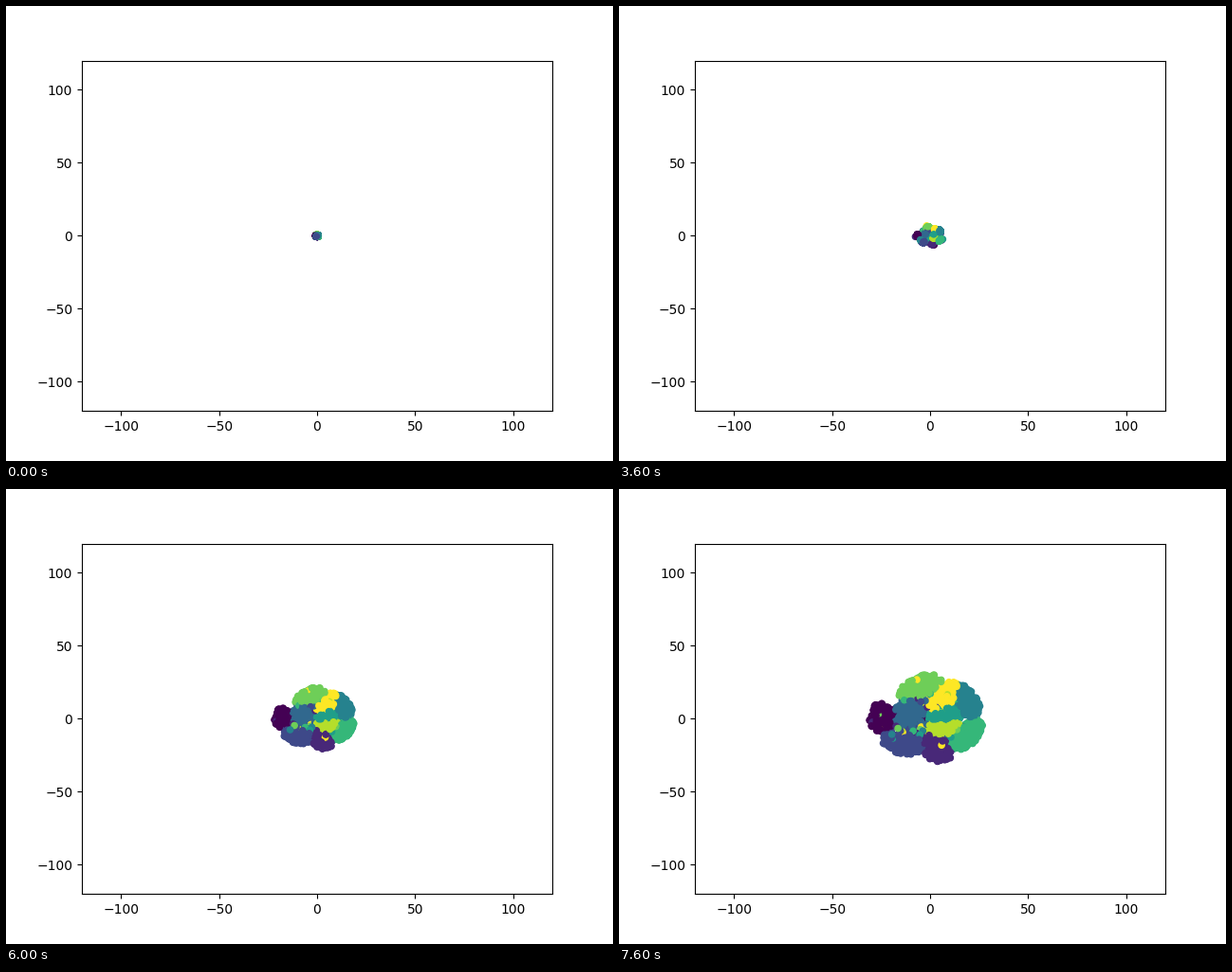
A matplotlib script that plays this animation: 640x480 px, repeating every 8 s.

```python
import matplotlib.pyplot as plt
import numpy as np
from matplotlib.animation import FuncAnimation

FRAMES, INTERVAL = 20, 400
PX_PER_UNIT = np.array([496 / 240, 369.6 / 240])
TAKEOFF = 9  # frame at which the compact knot starts to unfold

# One tilted ellipse per class: centre x, y, radii (pixels), tilt (degrees)
CLUSTERS = np.array([
    (-51, 1, 13, 16, 0),
    (7, -32, 18, 13, -50),
    (-29, -25, 22, 12, -12),
    (-22, 5, 16, 14, 0),
    (40, 20, 20, 12, 110),
    (14, 4, 19, 9, 0),
    (39, -17, 22, 11, 38),
    (-10, 34, 25, 11, 22),
    (13, -9, 19, 9, 15),
    (15, 24, 20, 11, 40),
])


def cluster_distance(points):
    """Distance to every cluster, 1 being the rim of its ellipse."""
    x, y, long, short, tilt = CLUSTERS.T
    tilt = np.radians(tilt)
    dx, dy = points[:, :1] - x, points[:, 1:] - y
    along = dx * np.cos(tilt) + dy * np.sin(tilt)
    across = dy * np.cos(tilt) - dx * np.sin(tilt)
    return np.hypot(along / long, across / short)


def make_points(rng, count=2200):
    """Fill a disc; each point joins the nearest cluster or is a stray."""
    radius = np.sqrt(rng.random(count))
    angle = 2 * np.pi * rng.random(count)
    places = np.column_stack([60 * radius * np.cos(angle) - 4,
                              47 * radius * np.sin(angle)])
    distance = cluster_distance(places)
    labels = distance.argmin(axis=1)
    outside = distance.min(axis=1) > 1
    stray = outside | (rng.random(count) < 0.02)
    labels[stray] = rng.integers(0, 10, stray.sum())
    anchors = np.where(stray[:, None], places, CLUSTERS[labels, :2])

    keep = ~outside | ((radius < 0.6) & (rng.random(count) < 0.4))
    places, anchors, labels = places[keep], anchors[keep], labels[keep]
    # Turn the drawing order so that a class 2 point lies on top
    shift = -1 - np.flatnonzero(labels == 2)[-1]
    return [np.roll(a, shift, axis=0) for a in (anchors, places - anchors, labels)]


anchors, offsets, labels = make_points(np.random.default_rng(4))


def positions(frame):
    knot = 0.025 + 0.23 * (1 - np.exp(-(frame / 2.3) ** 1.5))
    since = max(frame - TAKEOFF, 0)
    unfold = np.interp(since, [0, 1, 3, 6, 10], [0, 0.03, 0.19, 0.45, 0.745])
    looseness = 1 - 0.7 * np.exp(-since / 1.5)
    return (knot + unfold) * (anchors + looseness * offsets) / PX_PER_UNIT


fig, ax = plt.subplots(figsize=(6.4, 4.8), dpi=100)
ax.set_xlim(-120, 120)
ax.set_ylim(-120, 120)
dots = ax.scatter(*positions(0).T, c=labels, s=20, cmap="viridis")


def update(frame):
    dots.set_offsets(positions(frame))
    return (dots,)


anim = FuncAnimation(fig, update, frames=FRAMES, interval=INTERVAL,
                     repeat=True, repeat_delay=0)
plt.show()
```
